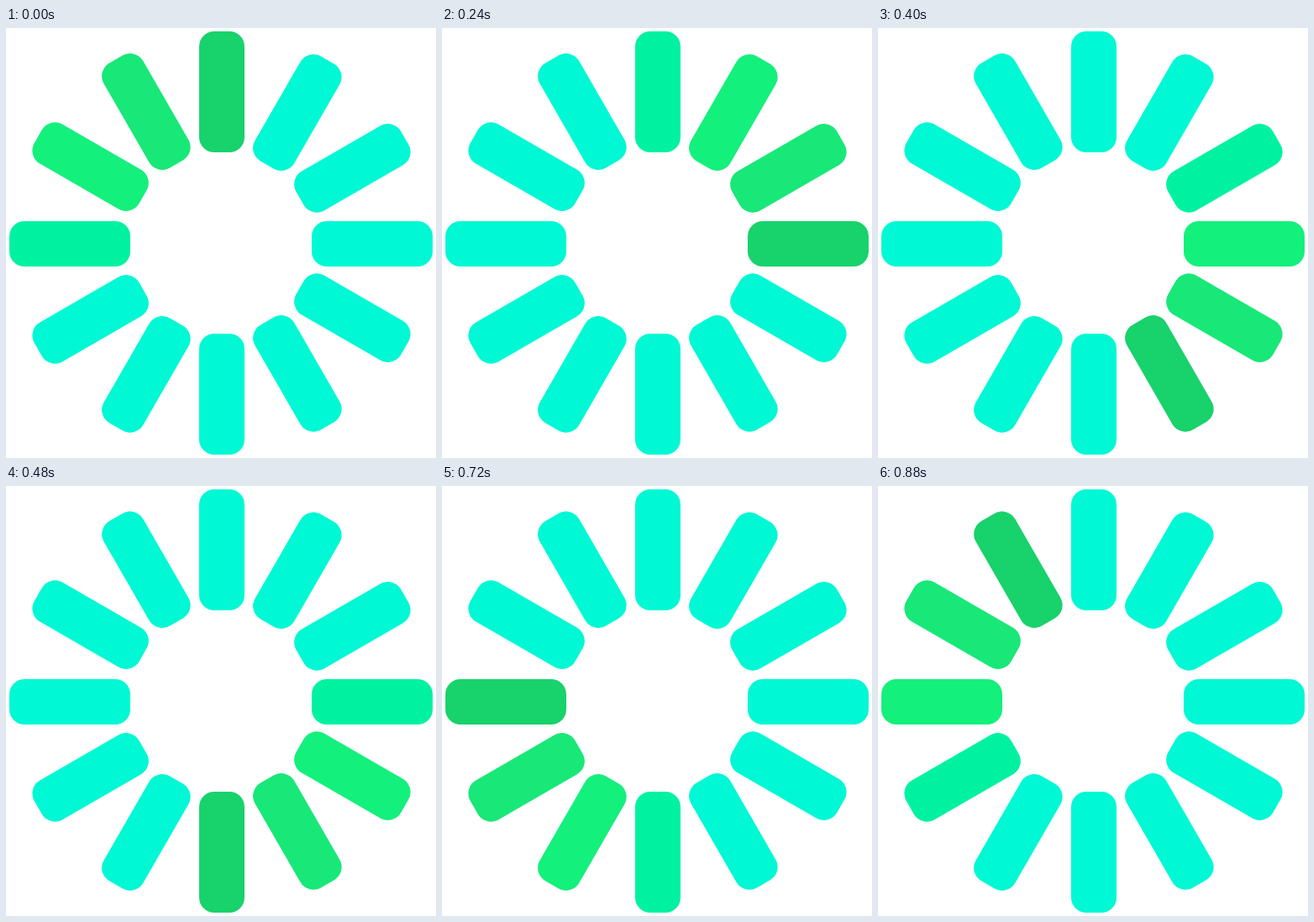
These frames come from a looping animation (512 by 512 pixels, 960 ms). An HTML page with a canvas:

```html
<!DOCTYPE html>
<html lang="en">
<head>
<meta charset="utf-8">
<title>Spinner</title>
<style>
  html, body { margin: 0; width: 100%; height: 100%; overflow: hidden; background: #fff; }
  canvas { display: block; }
</style>
</head>
<body>
<canvas id="stage" width="512" height="512"></canvas>
<script>
const ctx = document.getElementById("stage").getContext("2d");
const BARS = 12;
const STEP_MS = 80;
const REST = "#00f8d4";
const TRAIL = ["#18d26b", "#18e878", "#14f07c", "#00f2a0"]; // head first

function drawBar(index, color) {
  // Opposite bars share one axis, which sits one pixel off centre.
  const flipped = index >= 4 && index <= 9;
  const axis = flipped ? index - 6 : index > 9 ? index - BARS : index;
  ctx.save();
  ctx.translate(256, 256);
  ctx.rotate(axis * Math.PI / 6);
  ctx.fillStyle = color;
  ctx.beginPath();
  ctx.roundRect(-26, flipped ? 108 : -252, 54, 144, 18);
  ctx.fill();
  ctx.restore();
}

function draw(time) {
  const head = Math.floor(time / STEP_MS) % BARS;
  ctx.fillStyle = "#fff";
  ctx.fillRect(0, 0, 512, 512);
  for (let i = 0; i < BARS; i++) {
    const age = (head - i + BARS) % BARS;
    drawBar(i, TRAIL[age] || REST);
  }
}

const start = performance.now();
function tick() {
  draw(performance.now() - start);
  requestAnimationFrame(tick);
}
tick();
</script>
</body>
</html>
```
